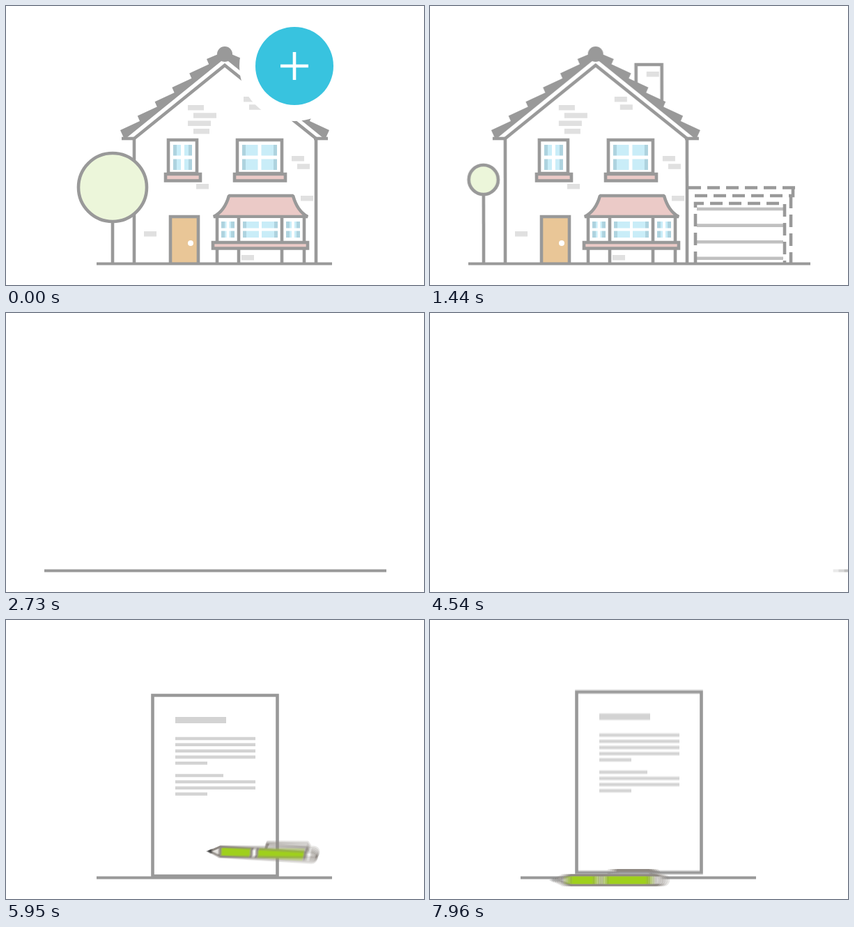
An HTML page with a canvas for the animation above (7990 ms loop, 600 by 400 pixels).

```html
<!DOCTYPE html>
<html lang="en">
<head>
<meta charset="utf-8">
<title>House extension and paperwork</title>
<style>
  html, body { margin: 0; width: 100%; height: 100%; overflow: hidden; background: #fff; }
  canvas { display: block; width: 100vw; height: 100vh; }
</style>
</head>
<body>
<canvas id="stage" width="600" height="400"></canvas>
<script>
const LOOP = 7990, SHUTTER = 15, SAMPLES = 5, FLOOR = 370, STROKE = 4.6;
const GRAY = '#999', PINK = '#ebcac7', BLUE = '#38c3df', LEAF = '#ecf6da', WOOD = '#e9c697';
const BRICK = '#e0e0e0', TEXT = '#d3d3d3', PEN = '#8f8983', GREEN = '#9fd01c';

const newContext = () =>
  Object.assign(document.createElement('canvas'), { width: 600, height: 400 }).getContext('2d');
const screen = document.getElementById('stage').getContext('2d');
const frame = newContext(), layer = newContext();
let c = frame;

// Timing helpers
const progress = (t, start, length) => Math.min(1, Math.max(0, (t - start) / length));
const inOut = (p, n = 3) => p < .5 ? (2 * p) ** n / 2 : 1 - (2 - 2 * p) ** n / 2;
const ease = (t, start, length, n) => inOut(progress(t, start, length), n);
const mix = (a, b, p) => a + (b - a) * p;

// Small hop, then a fast fall through the floor
function dropOut(t, start, lift, depth) {
  const down = progress(t, start + 220, 220);
  return -lift * ease(t, start, 220, 2) + (depth + lift) * down * down;
}

// Drawing helpers
function paint(fill, stroke, width = STROKE) {
  if (fill) { c.fillStyle = fill; c.fill(); }
  if (stroke) { c.strokeStyle = stroke; c.lineWidth = width; c.stroke(); }
}
function poly(points, fill, stroke, width) {
  c.beginPath();
  points.forEach(([x, y]) => c.lineTo(x, y));
  c.closePath();
  paint(fill, stroke, width);
}
function line(points, color = GRAY, width = STROKE) {
  c.beginPath();
  points.forEach(([x, y]) => c.lineTo(x, y));
  paint(null, color, width);
}
function dashed(points) {
  c.setLineDash([18, 9]);
  line(points);
  c.setLineDash([]);
}
function box(x, y, w, h, fill, stroke) {
  c.beginPath();
  c.rect(x, y, w, h);
  paint(fill, stroke);
}
function disc(x, y, r, fill, stroke) {
  c.beginPath();
  c.arc(x, y, r, 0, 7);
  paint(fill, stroke);
}
function moved(x, y, draw) {
  c.save();
  c.translate(x, y);
  draw();
  c.restore();
}
function aboveFloor(draw) {
  c.save();
  c.beginPath();
  c.rect(0, 0, 600, FLOOR);
  c.clip();
  draw();
  c.restore();
}
// Leans a drawing sideways, more strongly towards its top
function bent(amount, height, draw) {
  if (Math.abs(amount) < .05) return draw();
  const target = c;
  c = layer;
  c.clearRect(0, 0, 600, 400);
  draw();
  c = target;
  for (let y = 0; y < FLOOR; y++) {
    c.drawImage(layer.canvas, 0, y, 600, 1, amount * ((FLOOR - y) / height) ** 2, y, 600, 1);
  }
}

// House parts, laid out where the house comes to rest
const MID = 238;
const mirror = points => points.map(([x, y]) => [2 * MID - x, y]).reverse();

function glass(x, y, w, h, bar) {
  box(x, y, w, h, '#c9edf8');
  box(x, y, 5, h, '#aed3df');
  box(x + w - 5, y, 5, h, '#aed3df');
  box(x + (w - bar) / 2, y, bar, h, '#fff');
  box(x, y + (h - bar) / 2, w, bar, '#fff');
}
function sashWindow(x, w) {
  box(x, 192, w, 48, '#fff', GRAY);
  glass(x + 7, 199, w - 14, 36, 5);
  box(x - 4, 241, w + 9, 9.5, PINK, GRAY);
}

function bayWindow() {
  c.save();
  c.lineJoin = 'bevel';
  c.beginPath();
  c.moveTo(244, 272);
  c.lineTo(336, 272);
  c.quadraticCurveTo(342, 294, 357, 302);
  c.lineTo(222, 302);
  c.quadraticCurveTo(238, 294, 244, 272);
  c.closePath();
  paint(PINK, GRAY);
  c.restore();
  const posts = [227, 258, 320, 352];
  box(posts[0], 304, 125, 34, '#fff');
  for (let i = 0; i < 3; i++) {
    glass(posts[i] + 6, 309, posts[i + 1] - posts[i] - 12, 23, 4);
  }
  posts.forEach(x => line([[x, 303], [x, FLOOR]]));
  box(221, 339, 136, 8.5, PINK, GRAY);
}

function brickPatch(x, y, count) {
  for (let i = 0; i < count; i++) {
    const wide = 1 - Math.abs(2 * i + 1 - count) / count;
    box(x + 8 * (i % 2), y + 11.3 * i, 18 + (count > 2 ? 20 * wide : 0), 7.5, BRICK);
  }
}

function roof() {
  const tiles = 6, left = [[93, 189]];
  for (let i = 0; i < tiles; i++) {
    const x = 88 + 24.8 * i, y = 178 - 20.4 * i;
    left.push([x, y], [x + 28, y - 13]);
  }
  left.pop();
  left.push([MID, 65]);
  poly([...left, ...mirror(left), [379, 189], [MID, 75], [97, 189]], GRAY);
  disc(MID, 69, 11, GRAY);
  line([[108, 190], [MID, 85], [369, 190]]);
  const eave = [[90, 190], [110, 190]];
  line(eave);
  line(mirror(eave));
}

function house() {
  box(296, 84, 37, 60, '#fff', GRAY);
  brickPatch(311, 94, 1);
  poly([[92, 190], [MID, 65], [384, 190], [369, 190], [369, FLOOR], [108, FLOOR], [108, 190]], '#fff');
  brickPatch(185, 142, 4);
  brickPatch(265, 130, 2);
  brickPatch(334, 215, 2);
  brickPatch(347, 272, 1);
  brickPatch(197, 255, 1);
  brickPatch(122, 323, 1);
  brickPatch(262, 357, 1);
  [108, 369].forEach(x => line([[x, 190], [x, FLOOR]]));
  roof();
  sashWindow(157, 41);
  sashWindow(256, 64);
  box(160, 302, 40, 68, WOOD, GRAY);
  disc(189, 340, 4, '#fff');
  bayWindow();
}

function garage() {
  for (let i = 0; i < 4; i++) line([[383, 291 + 23.6 * i], [507, 291 + 23.6 * i]], '#c0c0c0');
  dashed([[524, 260.5], [370, 260.5]]);
  dashed([[521, 260], [521, 272], [370, 272]]);
  dashed([[518, 272], [518, FLOOR]]);
  dashed([[381, FLOOR], [381, 283], [509, 283], [509, FLOOR]]);
}

function loft() {
  dashed([[99, 85], [230, 85]]);
  dashed([[101, 96], [101, 85]]);
  dashed([[107, 97], [230, 97]]);
  dashed([[109, 97], [109, 170]]);
}

function tree(shrink) {
  const r = mix(49, 21, shrink), y = mix(260, 249, shrink);
  line([[77, y + r], [77, FLOOR]]);
  disc(77, y, r, LEAF, GRAY);
}

function ground(left, right) {
  if (right - left > 1) line([[left, 369.5], [right, 369.5]], GRAY, 4);
}

function plusButton(scale) {
  if (scale <= 0) return;
  moved(414, 86, () => {
    c.scale(scale, scale);
    disc(0, 0, 79, '#fff');
    disc(0, 0, 56, BLUE);
    line([[-20, 0], [20, 0]], '#fff');
    line([[0, -20], [0, 20]], '#fff');
  });
}

function houseScene(t) {
  const slide = at => 76 * ease(at, 400, 560, 2);
  const settle = progress(t, 960, 600);
  const lean = slide(t) - slide(t - 97) - 9 * Math.sin(3 * Math.PI * settle) * (1 - settle) ** 2;
  const houseX = 76 - slide(t);
  const widen = ease(t, 350, 440), shrink = ease(t, 3230, 750);

  aboveFloor(() => moved(0, dropOut(t, 2280, 45, 365), () => {
    if (t > 300) moved(-90 * (1 - ease(t, 400, 520)), 0, garage);
    if (t > 1640) {
      const hidden = 1 - ease(t, 1650, 450);
      moved(40 * hidden, 80 * hidden, loft);
    }
    bent(lean, 308, () => moved(houseX, 0, house));
    bent(lean * 1.25, 160, () => moved(houseX, 0, () => tree(ease(t, 800, 700))));
  }));
  ground(mix(mix(130, 55, widen), 300, shrink), mix(mix(468, 546, widen), 300, shrink));

  const p = progress(t, 30, 420);
  plusButton(1 - 4.8 * p ** 3 + 3.8 * p ** 2);
}

function sheet() {
  box(210.5, 108, 179, 259, '#fff', GRAY);
  box(243, 139, 73, 9, TEXT);
  [1, 1, 1, 1, .4, 0, .6, 1, 1, .4]
    .forEach((part, i) => box(243, 167.7 + 8.85 * i, 115 * part, 4.5, TEXT));
}

function passport() {
  c.beginPath();
  c.roundRect(154, 240, 87, 128, [0, 16, 16, 0]);
  paint(PINK, GRAY);
  [262.5, 271.5].forEach(y => line([[175, y], [220, y]]));
  disc(197, 321, 25, null, GRAY);
  c.beginPath();
  c.ellipse(197, 321, 12, 25, 0, 0, 7);
  paint(null, GRAY);
  [-1, 1].forEach(side => {
    c.beginPath();
    c.moveTo(179, 321 + side * 18);
    c.quadraticCurveTo(197, 321 + side * 4, 215, 321 + side * 18);
    paint(null, GRAY);
  });
}

function pen(x, y, angle) {
  moved(x, y, () => {
    c.rotate(angle);
    c.lineJoin = 'round';
    line([[86, -9], [86, -14], [143, -14], [147, -8]], PEN, 4);
    poly([[4, 0], [19, -7], [19, 7]], '#e6e4e0', PEN, 3);
    c.beginPath();
    c.roundRect(19, -7, 140, 14, [0, 7, 7, 0]);
    paint('#c9c6c2', PEN, 3.5);
    box(21, -5.5, 41, 11, GREEN);
    box(74, -5.5, 65, 11, GREEN);
    box(66, -5.5, 4, 11, '#fff');
    box(145, -5.5, 4, 11, '#fff');
    [64, 72, 141].forEach(at => line([[at, -7], [at, 7]], PEN, 3));
    poly([[0, 0], [7, -3.5], [7, 3.5]], '#444');
  });
}

// The pen flies in, writes, drops to the floor, rolls aside and back, then leaves
function movingPen(t) {
  const arrive = ease(t, 5350, 210, 2), write = progress(t, 5560, 240);
  const fall = progress(t, 5800, 310), roll = progress(t, 6110, 590);
  const swing = Math.sin(Math.PI * fall);
  const x = mix(640, 345, arrive) + 8 * Math.sin(2 * Math.PI * write)
    - 48 * (1 - (1 - fall) ** 2) - 23 * swing
    + 110 * Math.sin(Math.PI * roll) ** 2 - .0015 * Math.max(0, t - 7670) ** 2;
  const y = mix(300, 331, arrive) + 9 * Math.sin(4 * Math.PI * write) + 42 * fall ** 6;
  pen(x, y, -.61 * Math.cos(3.66 * fall) * (1 - fall));
}

function paperScene(t) {
  const left = mix(130, 600, (1 - progress(t, 4530, 650)) ** 3);
  const bounce = progress(t, 6270, 610);
  const passportY = 134 * Math.cos(2 * Math.PI * bounce) * (1 - bounce) ** 1.2;

  aboveFloor(() => {
    const rise = 265 * (1 - ease(t, 5100, 390));
    moved(0, rise + dropOut(t, 7892, 32, 265), sheet);
  });
  ground(left, left + 338);
  aboveFloor(() => moved(0, passportY + dropOut(t, 7290, 32, 134), passport));
  if (t > 5350) movingPen(t);
}

// Averages a few moments for motion blur
function render(time) {
  for (let i = 0; i < SAMPLES; i++) {
    const t = Math.max(0, time - SHUTTER * i / (SAMPLES - 1));
    c.fillStyle = '#fff';
    c.fillRect(0, 0, 600, 400);
    (t < 4200 ? houseScene : paperScene)(t);
    screen.globalAlpha = 1 / (i + 1);
    screen.drawImage(frame.canvas, 0, 0);
  }
}

let start;
function tick(now) {
  start ??= now;
  render((now - start) % LOOP);
  requestAnimationFrame(tick);
}
requestAnimationFrame(tick);
</script>
</body>
</html>
```
